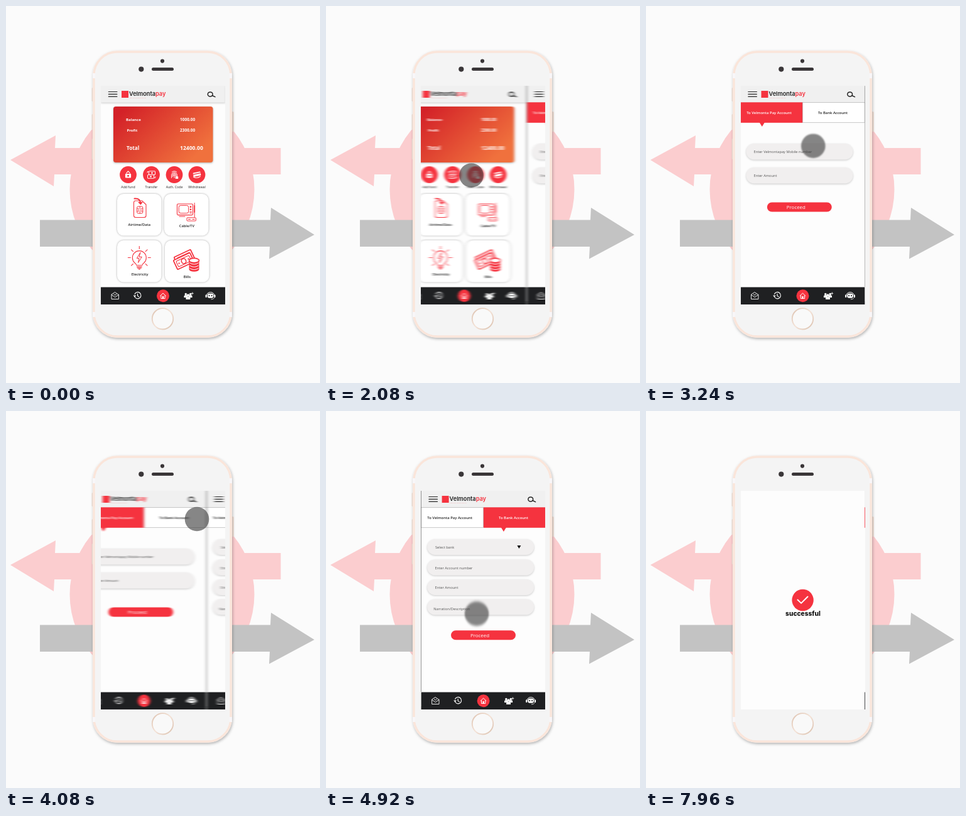
Write an HTML page that moves like this. It is 500 px wide and 600 px high and loops after 8 s.

```html
<!DOCTYPE html>
<html lang="en">
<head>
<meta charset="utf-8">
<title>Transfer demo</title>
<style>
html, body { margin: 0; width: 100%; height: 100%; overflow: hidden; background: #fbfbfb; }
svg { display: block; width: 500px; height: 600px; }
text { font-family: "Open Sans", "Noto Sans", sans-serif; fill: #222; }
.inter { font-family: Inter, "Open Sans", sans-serif; }
.hint { font-size: 5.7px; fill: #555; }
.tab { font-size: 5.9px; font-weight: 600; }
.label { font-size: 5.2px; font-weight: 500; text-anchor: middle; }
.tile { font-size: 5.7px; font-weight: 600; text-anchor: middle; }
.card { font-weight: 700; }
.white { fill: #fff; }
.line { fill: none; stroke-linecap: round; stroke-linejoin: round; }
.soft { filter: drop-shadow(0 1px 1.5px rgba(0,0,0,.2)); }
</style>
</head>
<body>
<script>
const RED = '#f5333f', LOOP = 8000, STEP = 40;

const text = (x, y, s, cls = '', extra = '') => `<text x="${x}" y="${y}" class="${cls}" ${extra}>${s}</text>`;
const rect = (x, y, w, h, fill, r = 0, extra = '') =>
  `<rect x="${x}" y="${y}" width="${w}" height="${h}" rx="${r}" fill="${fill}" ${extra}/>`;
const dot = (x, y, r, fill, extra = '') => `<circle cx="${x}" cy="${y}" r="${r}" fill="${fill}" ${extra}/>`;
const line = (d, color, w = 1) => `<path class="line" d="${d}" stroke="${color}" stroke-width="${w}"/>`;
const shape = (d, fill) => `<path d="${d}" fill="${fill}"/>`;
const at = (x, y, body, turn = 0) => `<g transform="translate(${x} ${y}) rotate(${turn})">${body}</g>`;
const field = (x, y, h = 25.5) => rect(x, y, 170, h, '#f1efef', h / 2, 'class="soft"');
const button = (x, y) => rect(x, y, 103, 15, RED, 7.5) + text(x + 31, y + 10.8, 'Proceed', 'white', 'font-size="7.9"');

const header = rect(151, 127, 198, 26.5, '#f0f0f0', 0, 'class="soft"')
  + line('M163.3 136.5h13.6M163.3 140.3h13.6M163.3 144.1h13.6', '#222', 1.2)
  + rect(184, 135, 11, 11, RED)
  + text(196, 143, `Velmonta<tspan fill="${RED}">pay</tspan>`, 'inter', 'font-size="9.2" font-weight="600"')
  + text(197, 146.6, 'fast and simple top up', '', 'font-size="2.5" style="fill:#f0a0a4"')
  + '<ellipse cx="325.2" cy="140.4" rx="3.9" ry="3.5" fill="none" stroke="#222" stroke-width="1.5"/>'
  + line('M328.3 142.5L333 144.6', '#222', 1.5);

const person = (x, y, s) => dot(x, y - 2.4 * s, 1.8 * s, '#fff')
  + shape(`M${x - 3 * s} ${y + 3.4 * s}v-1.6a${3 * s} ${2.4 * s} 0 0 1 ${6 * s} 0v1.6z`, '#fff');

const footer = rect(151, 447.5, 198, 28, '#1f2022')
  + line('M168 459.5v7h11.4v-7l-5.7-3.8zl5.7 4 5.7-4M171.7 458.5l2 1.8 2-1.8', '#fff', 0.9)
  + line('M205 458.5a5.2 5.2 0 1 1-.3 3.4M209.5 458v3.4l2.2 1.4', '#fff', 1.1)
  + shape('M202.6 460.6h4.6l-2.3 3z', '#fff')
  + dot(250, 461.2, 10, RED)
  + line('M245.6 461.3l4.4-4.2 4.4 4.2M246.9 461v4.5h6.2V461', '#fff', 1)
  + rect(248.9, 461.8, 2.2, 3.7, '#fff')
  + person(286.3, 460.7, .95) + person(293.7, 460.7, .95) + person(290, 463, 1.15)
  + line('M296.8 455.8v3.2M295.2 457.4h3.2', '#fff', .8)
  + line('M319 461.5a6.6 6 0 0 1 13.2 0', '#fff', 1)
  + rect(317.6, 459.5, 2.2, 4.6, '#fff', 1) + rect(331.3, 459.5, 2.2, 4.6, '#fff', 1)
  + rect(320.8, 457.6, 9.6, 7.2, '#fff', 3)
  + dot(323.6, 461, 1.1, '#1f2022') + dot(327.6, 461, 1.1, '#1f2022')
  + line('M331.8 464.5q-1.2 2.4-5 2.4', '#fff', .8);

const note = rect(-5, -2.8, 10, 5.6, 'none', .5, 'stroke="#fff" stroke-width="1"') + dot(0, 0, 1.3, '#fff');
const quick = [
  [194.5, 'Add fund', line('M-2.8-2.4L0-5.6l2.8 3.2', '#fff', 1.2) + rect(-4.6, -1.6, 9.2, 6.6, '#fff', 1) + dot(0, 1.8, 1.5, RED)],
  [231.5, 'Transfer', at(1, -2.8, note) + at(-1, 3, note) + line('M-6.3-3v-2h1.6M6.3 3v2h-1.6', '#fff', .9)],
  [268, 'Auth. Code', [1.2, 2.8, 4.4].map(r => line(`M${-r} ${r + .6}v${-r}a${r} ${r} 0 0 1 ${2 * r} 0v${r}`, '#fff', .9)).join('')
    + line('M0 0v5M-3.8-4.4q3.8-2.8 7.6 0', '#fff', .9) + rect(1.8, 2.8, 4.4, 3.6, '#fff', .5)],
  [304, 'Withdrawal', at(0, -1, rect(-6, -3, 12, 6.4, '#fff', 1) + rect(-6, -1.4, 12, 1.3, RED), -12)
    + line('M-5.6 3.6q5.6 3.2 11-.8', '#fff', 1.1)]
].map(([x, s, icon]) => dot(x, 268.5, 13.4, RED) + at(x, 268.5, icon) + text(x, 290, s, 'label')).join('');

const sim = line('M206 310h10.5l6.5 6v17.5q0 3-3 3h-13.5q-3 0-3-3v-20.5q0-3 2.5-3z', RED, 1.1)
  + rect(208.6, 319, 9.2, 11, 'none', 2, `stroke="${RED}"`)
  + line('M208.6 322.7h3v3.8h-3M217.8 322.7h-3v3.8h3M213.2 319v3.5M213.2 326.5v3.5', RED, .8)
  + line('M204.5 306.6q8.5-1 9.5 6', RED, 2) + shape('M210 312h8l-3.6 4.4z', RED);

const tv = rect(272.5, 315, 25, 17.6, 'none', 1.5, `stroke="${RED}" stroke-width="1.1"`)
  + rect(275.2, 317.4, 15.5, 12.4, 'none', 3, `stroke="${RED}"`)
  + dot(294, 319.7, 1.4, RED) + dot(294, 323.8, 1.4, RED)
  + line('M292.8 327.5h2.6M292.8 329.5h2.6M276 335h9M300.2 313.5V337', RED, 1)
  + line('M300.2 318v10', RED, 1.8)
  + rect(288, 336.8, 14.4, 5.2, '#fff', 1, `stroke="${RED}"`)
  + line('M290.5 339.5h3M297 339.5h3', RED, 1);

const rays = [...Array(8)].map((_, i) => {
  const a = i * Math.PI / 4, c = Math.cos(a), s = Math.sin(a);
  return i === 2 ? '' : line(`M${c * 14} ${s * 14}L${c * 18} ${s * 18}`, RED, 1.1);
}).join('');
const bulb = at(212.3, 400.5, rays
  + line('M-4.5 12.2q0-2-3.2-4.2a11 11 0 1 1 15.4 0q-3.2 2.2-3.2 4.2z', RED, 1.1)
  + line('M-4 14.6h8M-3 16.6h6M-1 18.4h2', RED, 1.2)
  + line('M1.5-8l-5.5 9h3.6l-1.4 7 5.8-9.2H.2z', RED, 1));

const bill = rect(-14.5, -8, 29, 16, '#fff', 1, `stroke="${RED}" stroke-width="1.8"`)
  + rect(-11.3, -4.8, 22.6, 9.6, 'none', 1.5, `stroke="${RED}" stroke-width="1.1"`)
  + `<ellipse rx="3.6" ry="4.2" fill="#fff" stroke="${RED}" stroke-width="1.6"/>`
  + dot(-8.2, 0, 1.2, RED) + dot(8.2, 0, 1.2, RED);
const bills = at(284, 401, bill, -25) + at(283, 406, bill, -25)
  + shape('M291.5 405v14a8 3.8 0 0 0 16 0v-14z', RED)
  + '<ellipse cx="299.5" cy="405" rx="8" ry="3.6" fill="#fff" stroke="#f5333f" stroke-width="1.7"/>'
  + [409, 413.3, 417.6].map(y => line(`M292.8 ${y}q6.7 4.2 13.4 0`, '#fff', 1)).join('');

const tiles = [
  [177, 299, 212.3, 350.3, 'Airtime/Data', sim],
  [252, 299, 288, 351.6, 'Cable/TV', tv],
  [177, 373, 213.2, 429, 'Electricity', bulb],
  [253, 373, 288.3, 433, 'Bills', bills]
].map(([x, y, tx, ty, s, icon]) =>
  rect(x, y, 70.5, 66.5, '#fff', 10, 'style="filter:drop-shadow(0 0 1.5px rgba(0,0,0,.33))"')
  + icon + text(tx, ty, s, 'tile')).join('');

const money = [
  [191, 183.2, 'Balance', 277, '1000.00', 6, 6.5],
  [192.5, 200, 'Profit', 277, '2300.00', 6, 6.5],
  [192, 228.8, 'Total', 277, '12400.00', 8.2, 8.6]
].map(([x, y, a, x2, b, s1, s2]) =>
  text(x, y, a, 'card white', `font-size="${s1}"`) + text(x2, y - .2, b, 'card white', `font-size="${s2}"`)).join('');

const page = (x, body) => `<g transform="translate(${x})">${rect(150.1, 127, 198.9, 349, '#fdfdfd')}${header}${body}${footer}`
  + (x ? rect(150.1, 127, .9, 320, '#555') + rect(150.1, 470, .9, 6, '#888') : '') + '</g>';

const tabs = right => rect(right ? 250 : 151, 153.3, 99, 32.5, RED)
  + rect(right ? 151 : 250, 153.5, 98.7, 32, '#fff', 0, 'stroke="#aaa" stroke-width=".6"')
  + shape(`M${right ? 278 : 181} 185h8.6l-4.3 7z`, RED)
  + text(160.7, 172.2, 'To Velmonta Pay Account', right ? 'tab' : 'tab white')
  + text(274.4, 172.2, 'To Bank Account', right ? 'tab white' : 'tab');

const home = rect(171, 160, 158.5, 89, 'url(#warm)', 4, 'style="filter:drop-shadow(0 1px 1.5px rgba(0,0,0,.3))"')
  + money + quick + tiles;

const wallet = tabs(false)
  + field(160, 219) + text(172, 234.2, 'Enter Velmontapay Mobile number', 'hint')
  + field(160, 257) + text(172, 271.6, 'Enter Amount', 'hint')
  + button(193.3, 312.5);

const values = [['Ordel Bank', 217.8], ['4108265937', 252], ['5000', 283], ['payment for the dress', 314.4]];
const bank = tabs(true)
  + [204, 236.5, 268, 299.5].map(y => field(160.6, y, 25)).join('')
  + shape('M303.8 214h6l-3 5z', '#111')
  + '<g id="hints">' + [[173.4, 218.6, 'Select bank'], [173, 251.8, 'Enter Account number'],
    [173, 283, 'Enter Amount'], [170.6, 316.6, 'Narration/Description']].map(h => text(...h, 'hint')).join('') + '</g>'
  + values.map(([, y]) => text(177.6, y, '', 'inter typed', 'font-size="7.8" font-weight="500"')).join('')
  + button(198.4, 349.2);

const backdrop = dot(248.5, 292, 147, '#fbcdcf')
  + shape('M7 245L79 206 78 226H437.5V268H77L76 287z', '#fbcdcf')
  + shape('M54 340.5H421L422 321 491 364 419 402.5 420 383H54z', '#c3c3c3');

const phone = [[136.6, 130, 22], [136.6, 172, 25], [136.6, 211, 33], [359, 168, 32]]
    .map(([x, y, h]) => rect(x, y, 4, h, '#f3e3da', 1.5)).join('')
  + rect(138, 71, 222, 457, '#faf3ef', 39, 'style="filter:drop-shadow(1px 2px 2px rgba(0,0,0,.28))"')
  + rect(140, 73, 218, 453, '#f4f4f4', 37, 'stroke="#fae5da" stroke-width="3.4"')
  + [107, 487].map(y => rect(138, y, 4, 8, '#f8f6f8') + rect(356, y, 4, 8, '#f8f6f8')).join('')
  + dot(215.3, 100.6, 4.1, '#3a3638') + dot(249, 87.6, 3.1, '#3a3638') + rect(232, 98, 35, 5, '#3a3638', 2.5)
  + dot(249.5, 497.8, 16.7, '#f9f9f9', 'stroke="url(#gold)" stroke-width="1.9"');

const success = rect(150, 126, 198.2, 350, '#fdfdfd') + dot(249.6, 301, 17.2, RED)
  + line('M241.5 300.5l5.6 5.4 10.4-10.4', '#fff', 2)
  + text(250, 326.4, 'successful', 'inter', 'font-size="10.2" font-weight="800" text-anchor="middle" style="fill:#111"');

document.body.innerHTML = `<svg viewBox="0 0 500 600">
<defs>
  <linearGradient id="warm" x1="0" y1="0" x2="1" y2=".6"><stop offset=".1" stop-color="#d32128"/><stop offset="1" stop-color="#f0713d"/></linearGradient>
  <linearGradient id="gold" x1="0" y1="0" x2="1" y2="1"><stop stop-color="#dcc0ad"/><stop offset=".5" stop-color="#f4e3d8"/><stop offset="1" stop-color="#d9bda9"/></linearGradient>
  <clipPath id="screen"><rect x="151" y="127" width="198" height="348"/></clipPath>
  <filter id="smear" filterUnits="userSpaceOnUse" x="100" y="120" width="700" height="362" color-interpolation-filters="sRGB"><feGaussianBlur stdDeviation="2.3 0"/></filter>
  <filter id="drag" x="-50%" y="-50%" width="200%" height="200%" color-interpolation-filters="sRGB"><feGaussianBlur id="dragBlur" stdDeviation=".4"/></filter>
</defs>
${backdrop}${phone}
<g clip-path="url(#screen)">
  <g id="smearBox"><g id="strip">${page(0, home)}${page(199, wallet)}${page(398, bank)}</g></g>
  <g id="cursor"><circle r="19.3" fill="#3c3c3c" fill-opacity=".62" filter="url(#drag)"/></g>
  <g id="success">${success}</g>
</g></svg>`;

const el = id => document.getElementById(id);
const strip = el('strip'), smearBox = el('smearBox'), cursor = el('cursor'), dragBlur = el('dragBlur');
const hints = el('hints'), done = el('success'), typed = [...document.querySelectorAll('.typed')];

const ramp = (t, a, b) => Math.min(1, Math.max(0, (t - a) / (b - a)));
const slides = [[2005, 2505, 199.5], [4005, 4505, 197.9]];
const taps = [[1500, 2000], [3500, 4000], [6510, 7030]];
const path = [[281, 418], [231.5, 269.5, 1000, 1500], [304, 172, 3000, 3500], [225, 358, 4515, 5015]];

function place(t) {
  let [x, y] = path[0];
  for (const [px, py, a, b] of path.slice(1)) {
    const p = ramp(t, a, b);
    x += (px - x) * p;
    y += (py - y) * p;
  }
  return [x, y];
}

function draw(t) {
  const shift = slides.reduce((sum, [a, b, d]) => sum + d * ramp(t, a, b), 0);
  strip.setAttribute('transform', `translate(${-shift})`);
  if (slides.some(([a, b]) => t > a && t < b)) smearBox.setAttribute('filter', 'url(#smear)');
  else smearBox.removeAttribute('filter');

  const [x, y] = place(t), [x0, y0] = place(t - 10), [x1, y1] = place(t + 10);
  const scale = taps.reduce((s, [a, b]) => s - .2 * Math.sin(Math.PI * ramp(t, a, b)), 1);
  cursor.setAttribute('transform', `translate(${x} ${y}) scale(${scale})`);
  cursor.setAttribute('opacity', ramp(t, 500, 1000));
  const blur = d => Math.max(.4, Math.abs(d) / 3.5);
  dragBlur.setAttribute('stdDeviation', `${blur(x1 - x0)} ${blur(y1 - y0)}`);

  hints.setAttribute('opacity', 1 - ramp(t, 5010, 5510));
  const p = ramp(t, 5520, 6200);
  typed.forEach((node, i) => {
    const s = values[i][0];
    node.textContent = s.slice(0, Math.round(s.length * p));
  });
  done.setAttribute('opacity', ramp(t, 7450, 7950));
}

const start = performance.now();
function tick() {
  const t = (performance.now() - start) % LOOP;
  draw(Math.floor(t / STEP) * STEP);
  requestAnimationFrame(tick);
}
tick();
</script>
</body>
</html>
```
